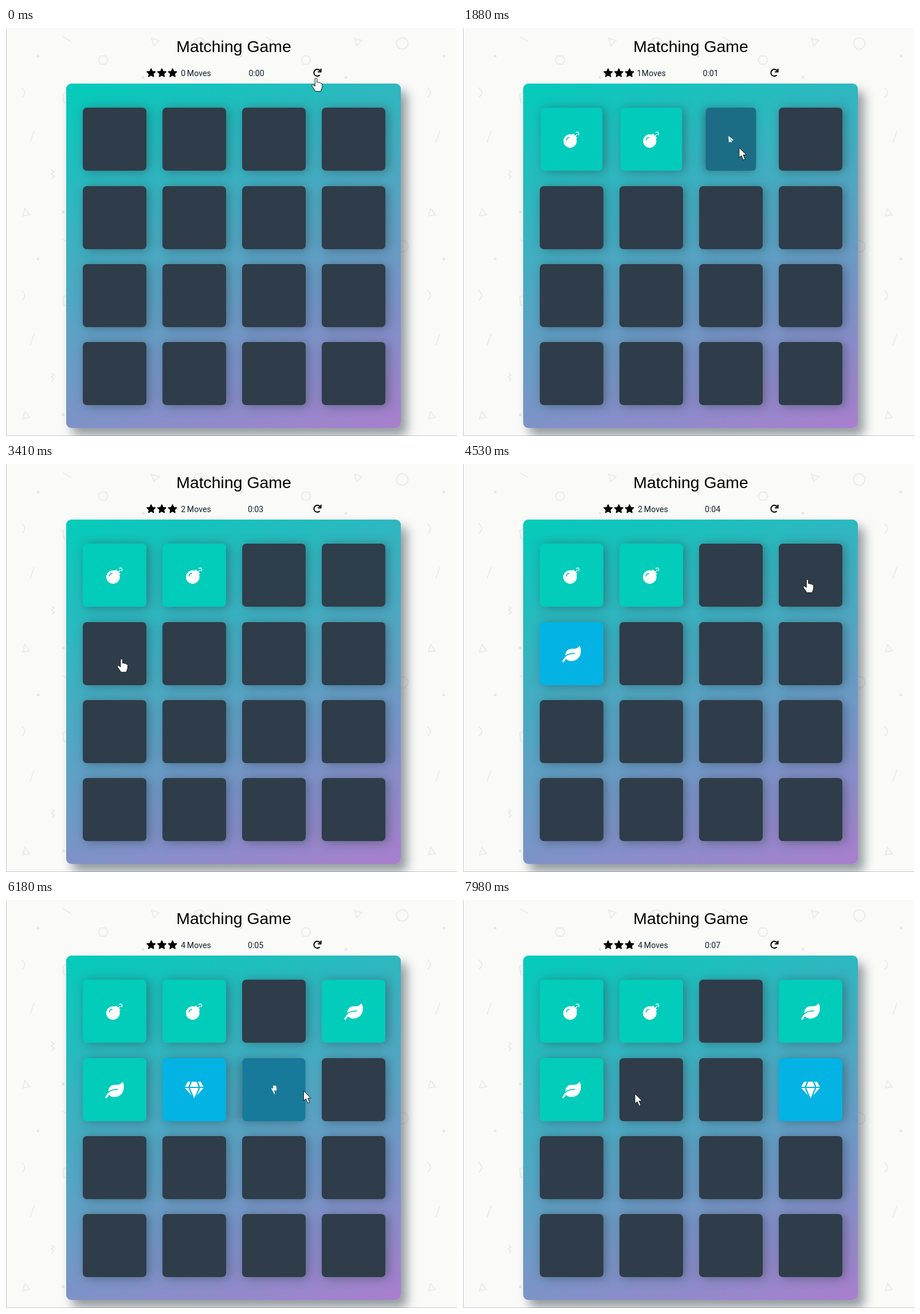
These frames come from a looping animation (787x712 px, 8000 ms). An HTML page:

```html
<!DOCTYPE html>
<html lang="en">
<head>
<meta charset="utf-8">
<title>Matching Game</title>
<style>
html, body { margin: 0; width: 100%; height: 100%; overflow: hidden; background: #fafaf8; }
#stage { position: relative; width: 787px; height: 712px; overflow: hidden; }
#stage > svg { position: absolute; left: 0; top: 0; }
#deck {
  position: absolute; left: 105px; top: 97px; width: 584px; height: 601px; border-radius: 9px;
  background: linear-gradient(160deg, #02ccba 0%, #aa7ecd 100%);
  box-shadow: 10.6px 13.3px 17.7px rgba(46, 61, 73, .5);
}
.card {
  position: absolute; width: 111px; height: 110px; border-radius: 7px;
  box-shadow: 4.4px 1.8px 17.7px rgba(46, 61, 73, .5);
}
.card svg { position: absolute; left: 39px; top: 41px; width: 33px; height: 29px; overflow: visible; }
text { font-family: Roboto, "Open Sans", sans-serif; font-size: 14.2px; fill: #12212c; }
#title { font-family: "Liberation Sans", Arial, sans-serif; font-size: 28.4px; fill: #000; }
</style>
</head>
<body>
<div id="stage">
  <svg width="787" height="712">
    <pattern id="shapes" width="354" height="354" patternUnits="userSpaceOnUse">
      <g fill="none" stroke="#eaebed" stroke-width="2">
        <path d="M99 15l15 9M49 180l-7 20M27 104q11 8 1 17"/>
        <path d="M254 18l13 4-9 9zM29 328l4-13 8 11z"/>
        <path d="M161 56l4-7h9l4 7-4 7h-9zM99 116l9-5 8 8-5 12-10-1z"/>
        <path d="M79 248l5 3-5 4 5 4-4 4"/>
        <circle cx="337.5" cy="27" r="10"/>
      </g>
      <path d="M56 49h0M239 86h0M100 321h0" stroke="#e6e7ea" stroke-width="5" stroke-linecap="round"/>
    </pattern>
    <rect width="787" height="712" fill="url(#shapes)"/>
    <text id="title" x="397.5" y="42.3" text-anchor="middle">Matching Game</text>
    <g id="stars" stroke="#000" stroke-width="1.6" stroke-linejoin="round"></g>
    <text id="count" y="83.5"></text>
    <text id="label" y="83.5">Moves</text>
    <text id="clock" y="83.5"></text>
    <path d="M548.6 75.2A6 6 0 1 0 547.6 82.3M549.6 71V76.6H544" fill="none" stroke="#000" stroke-width="2"/>
    <path d="M.5 0V711.5H787" fill="none" stroke="#c4c5c6"/>
  </svg>
  <div id="deck"></div>
  <svg width="787" height="712">
    <g id="pointer" fill="#fff" stroke="#111" stroke-linejoin="round">
      <circle id="press" r="14" fill="#f5ea00" stroke="none" opacity=".5"/>
      <path id="arrow" d="M0 0V17.5L4 13.8 7.2 21.5 10.3 20.2 7.2 12.8H12.8Z"/>
      <path id="hand" d="M-1.8 1.5Q0-1 1.8 1.5V8Q3.8 6.5 5 8.5 7 7.3 8 9.5 10.5 8.8 10.8 11.5V16L8.5 23.5H-1L-7 14.5Q-8 11.5-5.2 11.8L-1.8 14.5Z"/>
    </g>
  </svg>
</div>
<script>
const LOOP = 8000, FLIP = 250, JUDGE = 420;
const CARD_W = 111, CARD_H = 110, STEP_X = 139, STEP_Y = 136.4;
const $ = id => document.getElementById(id);

// Icons on a 576 x 512 field; currentColor is the card's own colour
const icons = {
  bomb: `<circle cx="240" cy="304" r="208"/>
    <path d="M342 85L460 203L395 270L275 150Z" stroke-width="16"/>
    <path d="M410 150L462 98M508 72h24M472 12v24M497 46l17-17M447 46l-17-17M497 97l17 17" stroke-width="24"/>
    <path d="M128 272Q134 208 208 192" fill="none" stroke="currentColor" stroke-width="32"/>`,
  plane: `<path d="M528 15L46 292L150 344L460 86L218 400V498L312 412L456 470Z" stroke-width="24"/>`,
  leaf: `<path d="M532 2Q576 60 576 154C576 360 450 465 290 476Q190 480 120 410Q96 360 96 288C96 180 180 96 288 96H368Q480 96 532 2Z" stroke="none"/>
    <path d="M32 480Q80 390 160 330" fill="none" stroke-width="60"/>
    <path d="M384 240Q190 235 72 340" fill="none" stroke="currentColor" stroke-width="32"/>`,
  gem: `<path d="M90 0H486L576 160H0ZM0 192H576L288 512Z" stroke="none"/>
    <path d="M194 0L125 176L262 500M382 0L451 176L314 500" fill="none" stroke="currentColor" stroke-width="40"/>`,
  bolt: `<path d="M180 15H335L290 175H435L240 497L290 273H145Z" stroke-width="30"/>`
};

// Pointer stops: place and arrival; those with an icon turn a card over
const stops = [
  { x: 541, y: 87, open: 40 },
  { x: 212, y: 232, arrive: 390, open: 500, icon: "bomb" },
  { x: 348, y: 214, arrive: 1130, open: 1272, icon: "bomb" },
  { x: 462, y: 206, arrive: 1540, open: 1820, icon: "plane" },
  { x: 618, y: 228, arrive: 2480, open: 2775, icon: "leaf" },
  { x: 182, y: 345, arrive: 3450, open: 3600, icon: "leaf" },
  { x: 601, y: 201, arrive: 4520, open: 4670, icon: "leaf" },
  { x: 316, y: 315, arrive: 5350, open: 5452, icon: "gem" },
  { x: 476, y: 335, arrive: 5780, open: 6105, icon: "bolt" },
  { x: 611, y: 329, arrive: 6380, open: 7145, icon: "gem" },
  { x: 295, y: 440, arrive: 7600, open: 7600 },
  { x: 300, y: 338, arrive: 7930 }
];

// Every two turns make a move, judged shortly after the second card opens
const turns = stops.filter(s => s.icon);
turns.forEach((turn, n) => {
  turn.card = Math.floor((turn.x - 134) / STEP_X) + 4 * Math.floor((turn.y - 139) / STEP_Y);
  const first = turns[n - 1];
  if (n % 2) {
    const key = first.icon === turn.icon ? "match" : "close";
    first[key] = turn[key] = turn.open + JUDGE;
  }
});

const dark = [46, 61, 73], blue = [2, 179, 228], green = [2, 204, 186];
const lerp = (a, b, k) => a + (b - a) * k;
const mix = (a, b, k) => a.map((v, n) => lerp(v, b[n], k));

// cubic-bezier(.25, .1, .25, 1)
function ease(x) {
  if (x <= 0) return 0;
  if (x >= 1) return 1;
  const curve = (a, b, u) => 3 * a * u * (1 - u) ** 2 + 3 * b * u * u * (1 - u) + u ** 3;
  let lo = 0, hi = 1;
  for (let n = 0; n < 24; n++) {
    const mid = (lo + hi) / 2;
    curve(.25, .25, mid) < x ? lo = mid : hi = mid;
  }
  return curve(.1, 1, lo);
}
const since = (t, start) => start === undefined ? 0 : ease((t - start) / FLIP);

function star(cx, cy) {
  const points = Array.from({ length: 10 }, (_, n) => {
    const r = n % 2 ? 3.6 : 7.5, a = n * Math.PI / 5;
    return [cx + r * Math.sin(a), cy - r * Math.cos(a)];
  });
  return `<polygon points="${points}"/>`;
}
$("stars").innerHTML = [0, 1, 2].map(n => star(253.2 + 18.7 * n, 78.7)).join("");

const cards = Array.from({ length: 16 }, (_, i) => {
  const el = document.createElement("div");
  const x = 134 + STEP_X * (i % 4), y = Math.round(139.2 + STEP_Y * Math.floor(i / 4));
  el.className = "card";
  el.style.left = x - 105 + "px";
  el.style.top = y - 97 + "px";
  el.innerHTML = '<svg viewBox="0 0 576 512" fill="#fff" stroke="#fff" stroke-linecap="round" stroke-linejoin="round"></svg>';
  $("deck").append(el);
  return { el, svg: el.firstChild, x, y, icon: "" };
});

function drawCard(card, i, t) {
  const turn = turns.filter(s => s.card === i && s.open <= t).pop();
  const shown = turn ? since(t, turn.open) * (1 - since(t, turn.close)) : 0;
  const matched = turn ? since(t, turn.match) : 0;
  const color = mix(mix(dark, blue, shown), green, matched).map(Math.round);
  card.el.style.background = card.el.style.color = `rgb(${color})`;
  card.el.style.transform = `scaleX(${Math.cos(2 * Math.PI * (shown + matched))})`;
  card.svg.style.transform = `scale(${shown})`;
  card.svg.style.visibility = shown ? "visible" : "hidden";
  if (turn && card.icon !== turn.icon) card.svg.innerHTML = icons[card.icon = turn.icon];
  card.closed = !turn || turn.close <= t;
}

function drawPointer(t) {
  // Leave a stop just after its click and slow down towards the next one
  const n = Math.max(0, stops.findLastIndex(s => s.open + 20 <= t));
  const from = stops[n], to = stops[n + 1], leave = from.open + 20;
  const k = Math.max(0, Math.min(1, (t - leave) / (to.arrive - leave))) ** .75;
  const x = lerp(from.x, to.x, k), y = lerp(from.y, to.y, k);
  const over = cards.some(c => c.closed && x > c.x && x < c.x + CARD_W && y > c.y && y < c.y + CARD_H);
  const hand = y < 92 || over && !!to.icon;
  const show = (id, on) => $(id).style.display = on ? "" : "none";
  $("pointer").setAttribute("transform", `translate(${x} ${y})`);
  show("hand", hand);
  show("arrow", !hand);
  show("press", turns.some(s => t >= s.open - 90 && t < s.open));
}

function drawScore(t) {
  const moves = turns.filter((s, n) => n % 2 && s.open <= t).length;
  // A narrow 1 pulls the centred row together; the first 0 is the widest
  const left = moves === 1 ? 303.6 : 305.3;
  $("count").textContent = moves;
  $("count").setAttribute("x", left);
  $("label").setAttribute("x", left + (moves === 1 ? 8.2 : 10.5));
  $("clock").textContent = "0:0" + Math.max(0, Math.floor((t - 230) / 1000));
  $("clock").setAttribute("x", moves === 1 ? 418.4 : moves ? 421.9 : 423.4);
}

const start = performance.now();
function tick() {
  const t = (performance.now() - start) % LOOP;
  cards.forEach((card, i) => drawCard(card, i, t));
  drawPointer(t);
  drawScore(t);
  requestAnimationFrame(tick);
}
tick();
</script>
</body>
</html>
```
